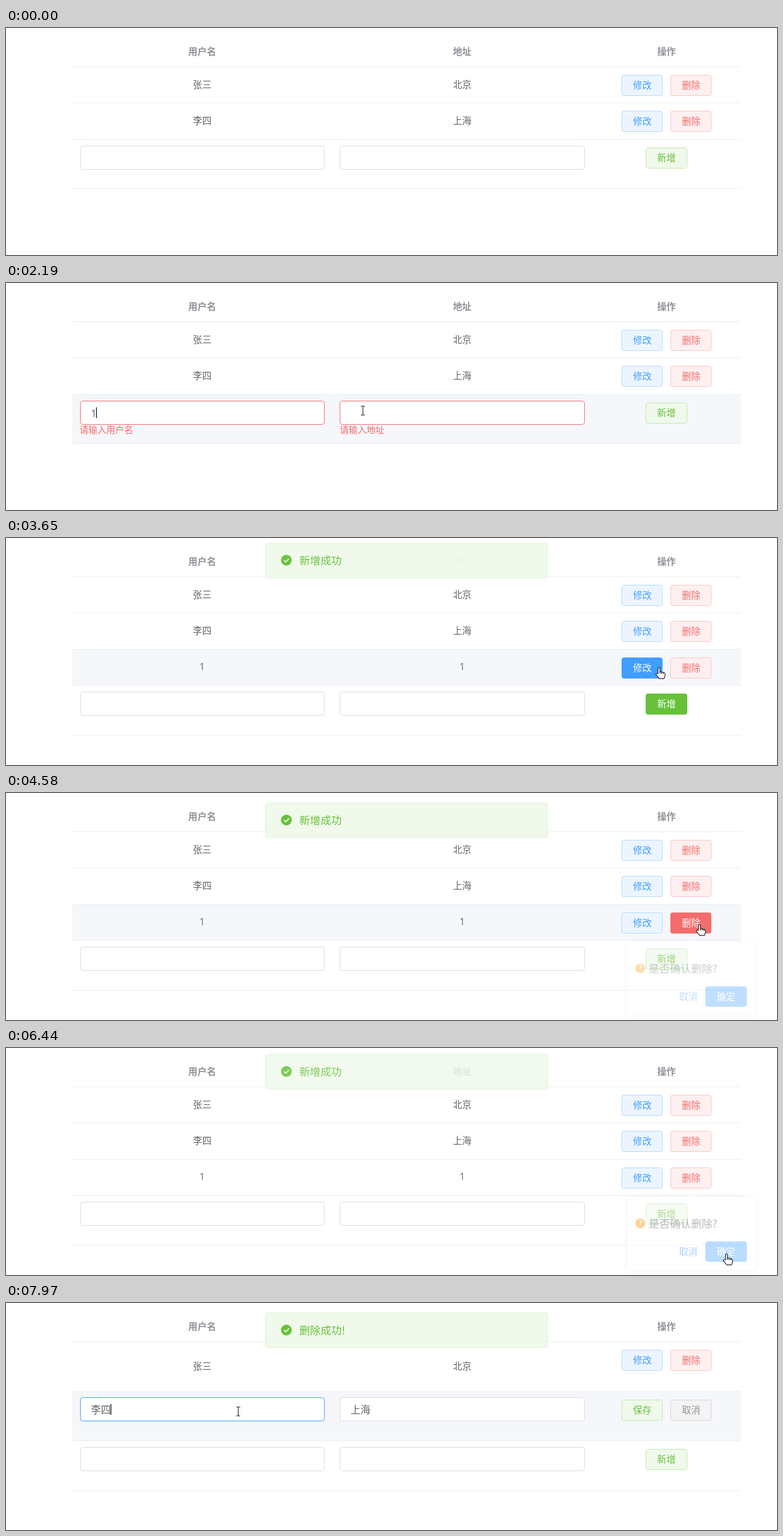
These frames come from a looping animation (1280x378 px, 8 s). An HTML page with a canvas:

```html
<!DOCTYPE html>
<html lang="zh-CN">
<head>
<meta charset="utf-8">
<title>用户表格</title>
<style>
html, body { margin: 0; width: 100%; height: 100%; overflow: hidden; background: #fff; }
canvas { display: block; width: 1280px; height: 378px; }
</style>
</head>
<body>
<canvas id="stage" width="1280" height="378"></canvas>
<script>
const page = document.getElementById('stage').getContext('2d');
const sheet = document.createElement('canvas');
sheet.width = 1280;
sheet.height = 378;
const overlay = sheet.getContext('2d');
let ctx = page;

const LOOP = 8000;
const FONT = '"Noto Sans CJK SC", "Noto Sans CJK", "Noto Sans", sans-serif';
const NUM_FONT = '"Open Sans", "Noto Sans", sans-serif';
const COL = [325.7, 757.3, 1096.6];
const LEFT = 110, WIDTH = 1110, HEAD = 64.3, ROW = 60.4, FORM_ROW = 82.7;
const FIELD = '#d8dbe2';

const THEME = {
  primary: { bg: '#ecf5ff', line: '#b3d8ff', main: '#409eff', dark: '#3a8ee6' },
  danger: { bg: '#fef0f0', line: '#fbc4c4', main: '#f56c6c', dark: '#dd6161' },
  success: { bg: '#f0f9eb', line: '#c2e7b0', main: '#67c23a', dark: '#5daf34' },
  info: { bg: '#f4f4f5', line: '#d3d4d6', main: '#909399', dark: '#82848a' }
};

// Moments of the session, in ms
const SUBMIT = 870, NAME_FOCUS = 1885, NAME_TYPE = 2080, ADDR_FOCUS = 2235, ADDR_TYPE = 2480;
const ADDR_BLUR = 3320, ADDED = 3422, ASK_DOWN = 4230, ASK = 4516, CANCEL = 5210;
const ASK_AGAIN = 5748, CONFIRM = 6330, REMOVED = 6460, EDIT = 7500, EDIT_FOCUS = 7860;

// Pointer path: time, x, y
const PATH = [
  [150, 1097, 333], [430, 1095, 221], [1280, 1094, 219], [1740, 420, 214], [1930, 420, 214],
  [2170, 592, 212], [2620, 592, 212], [3060, 1084, 216], [3800, 1084, 216], [4130, 1151, 219],
  [4680, 1151, 219], [5060, 1135, 343], [5290, 1135, 343], [5620, 1137, 209], [5880, 1137, 209],
  [6260, 1196, 343], [6600, 1196, 343], [6900, 1080, 221], [6990, 1078, 219], [7040, 1071, 185],
  [7170, 1062, 100], [7260, 1060, 98], [7400, 1056, 166], [7560, 1056, 166], [7830, 502, 176],
  [7880, 500, 176], [7970, 385, 180]
];
const HAND = new Path2D('M-1.5 10V1.2a1.6 1.6 0 0 1 3.2 0V6.5l6.5 1.6q2 .6 2 2.6v2.4l-1.6 5H.6l-5.4-6.4q-.8-1.8 1-2.2z');
const KNUCKLES = new Path2D('M1.7 6.5v3.5M4.6 7.5V10M7.4 8.2v2.3');
const ARROW = new Path2D('M0 0V17L4 13.2L12 12.6Z');
const BEAM = new Path2D('M-3.5 -7.5H-1L0 -6.5L1 -7.5H3.5M0 -6.5V6.5M-3.5 7.5H-1L0 6.5L1 7.5H3.5');

let t = 0, mouse = null, shape = 'arrow';

const clamp = v => Math.max(0, Math.min(1, v));
const bez = (a, b, s) => 3 * a * s * (1 - s) ** 2 + 3 * b * s * s * (1 - s) + s ** 3;

// CSS "ease"
function ease(x) {
  if (x <= 0) return 0;
  if (x >= 1) return 1;
  let lo = 0, hi = 1;
  for (let i = 0; i < 18; i++) {
    const mid = (lo + hi) / 2;
    if (bez(.25, .25, mid) < x) lo = mid; else hi = mid;
  }
  return bez(.1, 1, lo);
}

// 0..1 level that rises at a and falls at b
const span = (a, b, d = 100, f = ease) => f(clamp((t - a) / d)) - f(clamp((t - b) / d));
const during = (a, b) => t >= a && t < b;

function mix(a, b, k) {
  const ch = (c, i) => parseInt(c.substr(1 + 2 * i, 2), 16);
  return '#' + [0, 1, 2].map(i =>
    Math.round(ch(a, i) + (ch(b, i) - ch(a, i)) * k).toString(16).padStart(2, '0')).join('');
}

// Draws a group as a whole with one opacity
function faded(alpha, dy, paint) {
  if (alpha <= 0) return;
  overlay.clearRect(0, 0, 1280, 378);
  ctx = overlay;
  ctx.save();
  ctx.translate(0, dy);
  paint();
  ctx.restore();
  ctx = page;
  ctx.globalAlpha = alpha;
  ctx.drawImage(sheet, 0, 0);
  ctx.globalAlpha = 1;
}

function text(str, x, y, size, color, align = 'center', weight = '') {
  ctx.font = `${weight} ${size}px ${/^\d+$/.test(str) ? NUM_FONT : FONT}`;
  ctx.fillStyle = color;
  ctx.textAlign = align;
  ctx.fillText(str, x, y + size * .37);
  return ctx.measureText(str).width;
}

function box(x, y, w, h, r, fill, line) {
  ctx.beginPath();
  ctx.roundRect(x + .5, y + .5, w - 1, h - 1, r);
  ctx.fillStyle = fill;
  ctx.fill();
  ctx.strokeStyle = line;
  ctx.lineWidth = 1;
  ctx.stroke();
}

function disc(x, y, r, color) {
  ctx.beginPath();
  ctx.arc(x, y, r, 0, 7);
  ctx.fillStyle = color;
  ctx.fill();
}

function hit(x, y, w, h, kind) {
  const over = mouse && mouse.x >= x && mouse.x < x + w && mouse.y >= y && mouse.y < y + h;
  if (over) shape = kind;
  return over;
}

function button(label, x, top, theme, solid = 0, press = 0) {
  const c = THEME[theme], y = Math.round(top + 13.6);
  const main = mix(c.main, c.dark, press);
  box(x, y, x === 1062 ? 69 : 68, 35, 3, mix(c.bg, main, solid), mix(c.line, main, solid));
  text(label, x + 34.4, y + 17.5, 15.4, mix(c.main, '#ffffff', solid));
  hit(x, y, 69, 35, 'hand');
}

function input(x, top, line, value = '', focusAt = null, typeAt = null) {
  const y = Math.round(top + 10.45);
  box(x, y, x === 123 ? 406 : 407, 40, 4, '#ffffff', line);
  const w = value ? text(value, x + 18, y + 20.5, 16.5, '#606266', 'left') : 0;
  if (focusAt !== null) {
    const since = t - (typeAt !== null && t >= typeAt ? typeAt : focusAt);
    if (since % 1060 < 530) {
      ctx.fillStyle = '#303133';
      ctx.fillRect(Math.round(x + 18 + w) - .5, y + 11, 1.5, 18);
    }
  }
  hit(x, y, 407, 40, 'beam');
}

function error(str, x, top, k) {
  if (k <= 0) return;
  ctx.save();
  ctx.globalAlpha = k;
  ctx.translate(0, top + 51.7);
  ctx.scale(1, k);
  text(str, x, 8.2, 14.85, '#f56c6c', 'left');
  ctx.restore();
}

function rowBase(top, h, hover) {
  const a = Math.floor(top) + 1, b = Math.floor(top + h);
  if (hover > 0) {
    ctx.fillStyle = mix('#ffffff', '#f5f7fa', clamp(hover));
    ctx.fillRect(LEFT, a, WIDTH, b - a);
  }
  ctx.fillStyle = '#ebeef5';
  ctx.fillRect(LEFT, b, WIDTH, 1);
}

function dataRow(name, place, top, h, hover, edit, del, press = 0) {
  rowBase(top, h, hover);
  const y = top + h / 2 - .5;
  text(name, COL[0], y, 15.4, '#606266');
  text(place, COL[1], y, 15.4, '#606266');
  button('修改', 1022, top, 'primary', edit);
  button('删除', 1103, top, 'danger', del, press);
}

function editRow(top, h, hover) {
  rowBase(top, h, hover);
  const focused = t >= EDIT_FOCUS;
  input(123, top, mix(FIELD, '#409eff', ease((t - EDIT_FOCUS) / 100)), '李四', focused ? EDIT_FOCUS : null);
  input(554, top, FIELD, '上海');
  button('保存', 1022, top, 'success', span(EDIT - 100, EDIT_FOCUS));
  button('取消', 1103, top, 'info');
}

function addRow(top) {
  rowBase(top, FORM_ROW, span(340, ADDED, 250) + span(6780, 7020, 250));
  const nameBad = span(SUBMIT, ADDR_FOCUS, 200), addrBad = span(SUBMIT, ADDR_BLUR, 200);
  const pending = t < ADDED;
  const red = k => mix(FIELD, '#f56c6c', k);
  input(123, top, red(nameBad), pending && t >= NAME_TYPE ? '1' : '',
    during(NAME_FOCUS, ADDR_FOCUS) ? NAME_FOCUS : null, NAME_TYPE);
  input(554, top, red(addrBad), pending && t >= ADDR_TYPE ? '1' : '',
    during(ADDR_FOCUS, ADDR_BLUR) ? ADDR_FOCUS : null, ADDR_TYPE);
  error('请输入用户名', 122, top, span(SUBMIT + 60, ADDR_FOCUS, 250));
  error('请输入地址', 554, top, span(SUBMIT + 60, ADDR_BLUR, 250));
  const solid = span(390, NAME_FOCUS) + span(2990, ASK_DOWN) + span(6860, 7021);
  const press = span(SUBMIT - 90, SUBMIT) + span(ADDR_BLUR, ADDED);
  button('新增', 1062, top, 'success', solid, press);
}

function table() {
  ['用户名', '地址', '操作'].forEach((label, i) =>
    text(label, COL[i], 39.5, 15.4, '#909399', 'center', 'bold'));
  ctx.fillStyle = '#ebeef5';
  ctx.fillRect(LEFT, Math.floor(HEAD), WIDTH, 1);

  const editing = t >= EDIT, h = editing ? FORM_ROW : ROW;
  let top = HEAD;
  dataRow('张三', '北京', top, h, span(7125, 7320, 250), span(7135, 7310), 0);
  top += h;
  const hover = span(7040, 7125, 250) + span(7320, 9000, 250);
  if (editing) editRow(top, h, hover);
  else dataRow('李四', '上海', top, h, hover, span(7060, 7110) + span(7340, 9000), 0);
  top += h;
  if (during(ADDED, REMOVED)) {
    dataRow('1', '1', top, h,
      span(ADDED, 4800, 250) + span(5430, 6020, 250),
      span(ADDED, 3925),
      span(4010, CANCEL) + span(5520, CONFIRM),
      span(ASK_DOWN, ASK - 60) + span(5640, ASK_AGAIN - 3));
    top += h;
  }
  addRow(top);
}

function popover() {
  const k = span(ASK, CANCEL, 200, v => v) + span(ASK_AGAIN, CONFIRM, 200, v => v);
  faded(k, 0, () => {
    ctx.shadowColor = 'rgba(0,0,0,.1)';
    ctx.shadowBlur = 13;
    ctx.shadowOffsetY = 2;
    ctx.fillStyle = '#ffffff';
    ctx.beginPath();
    ctx.roundRect(1030, 247, 215, 124, 4);
    ctx.fill();
    ctx.shadowColor = 'transparent';
    box(1030, 247, 215, 124, 4, '#ffffff', '#ebeef5');
    ctx.fillStyle = '#ffffff';
    ctx.fill(new Path2D('M1130 248L1137 241L1144 248Z'));
    disc(1053, 292, 8, '#ff9900');
    text('?', 1053, 292, 12, '#ffffff', 'center', 'bold');
    text('是否确认删除?', 1067, 292.5, 17.6, '#606266', 'left');
    const onCancel = hit(1112, 322, 42, 34, 'hand'), onOk = hit(1161, 322, 69, 34, 'hand');
    text('取消', 1132.8, 339, 15.4, onCancel ? '#66b1ff' : '#409eff');
    const blue = onOk ? '#66b1ff' : '#409eff';
    box(1161, 322, 69, 34, 3, blue, blue);
    text('确定', 1195.3, 339, 15.4, '#ffffff');
  });
}

function message(str, start, end) {
  faded(span(start, end, 300), 60 * (span(start, end, 400) - 1), () => {
    box(430, 16, 470, 59, 4, '#f0f9eb', '#e1f3d8');
    disc(465.5, 45, 9, '#67c23a');
    ctx.strokeStyle = '#ffffff';
    ctx.lineWidth = 1.6;
    ctx.stroke(new Path2D('M461.5 45L464.4 48L469.8 42.4'));
    text(str, 487, 45.3, 17.6, '#67c23a', 'left');
  });
}

function locate() {
  if (t < PATH[0][0]) return null;
  const i = PATH.findIndex(p => p[0] > t);
  if (i < 0) return { x: 385, y: 180 };
  const [t0, x0, y0] = PATH[i - 1], [t1, x1, y1] = PATH[i];
  const u = (t - t0) / (t1 - t0), k = u * u * (3 - 2 * u);
  return { x: x0 + (x1 - x0) * k, y: y0 + (y1 - y0) * k };
}

function pointer() {
  if (!mouse) return;
  ctx.save();
  ctx.translate(Math.round(mouse.x), Math.round(mouse.y));
  ctx.lineJoin = 'round';
  ctx.lineWidth = 1.2;
  if (shape === 'beam') {
    ctx.translate(.5, .5);
    ctx.strokeStyle = '#303133';
    ctx.stroke(BEAM);
  } else {
    const hand = shape === 'hand', path = hand ? HAND : ARROW;
    ctx.fillStyle = hand ? '#ffffff' : '#dde3da';
    ctx.strokeStyle = hand ? '#222222' : '#ffffff';
    ctx.fill(path);
    ctx.stroke(path);
    if (hand) ctx.stroke(KNUCKLES);
  }
  ctx.restore();
}

function draw() {
  t = performance.now() % LOOP;
  mouse = locate();
  shape = 'arrow';
  ctx.fillStyle = '#ffffff';
  ctx.fillRect(0, 0, 1280, 378);
  table();
  popover();
  message('新增成功', ADDED, 6400);
  message('删除成功!', 6490, 9000);
  pointer();
  requestAnimationFrame(draw);
}
draw();
</script>
</body>
</html>
```
